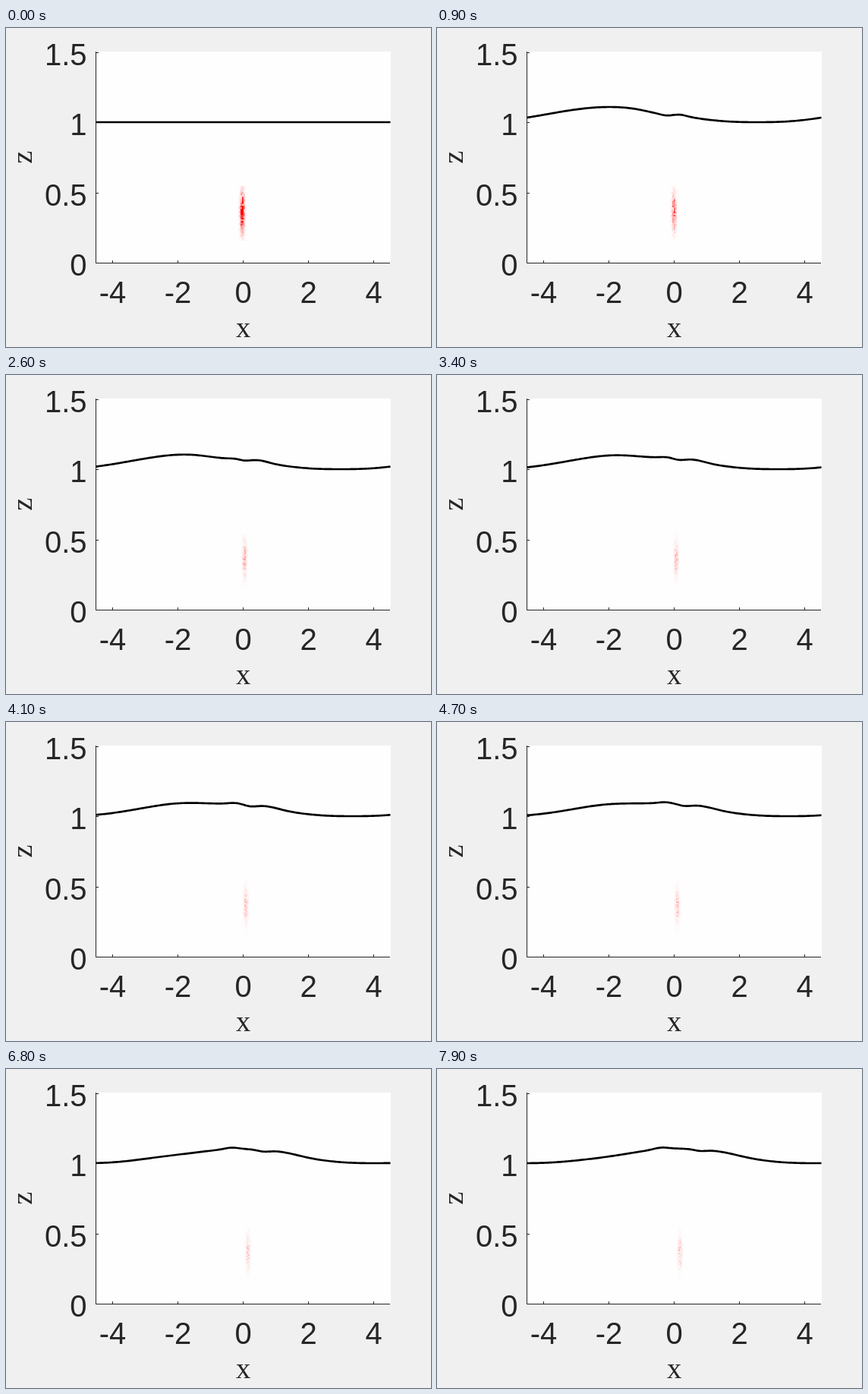
Recreate the animation shown at these times as an HTML page. Size 560 by 420 pixels, loop 8000 ms.

```html
<!DOCTYPE html>
<html lang="en">
<head>
<meta charset="utf-8">
<title>Surface wave over a cloud</title>
<style>
  html, body { margin: 0; width: 100%; height: 100%; overflow: hidden; background: #f0f0f0; }
  svg { display: block; width: 560px; height: 420px; }
  .tick { font: 40px "Liberation Sans", Arial, sans-serif; fill: #262626; }
  .label { font: 38.5px "Liberation Serif", Times, serif; fill: #262626; text-anchor: middle; }
</style>
</head>
<body>
<svg viewBox="0 0 560 420" xmlns="http://www.w3.org/2000/svg">
  <rect x="118" y="31" width="389" height="279" fill="#fefefe"/>
  <g id="cloud" fill="#f00" shape-rendering="crispEdges"></g>
  <path id="axes" fill="none" stroke="#262626"/>
  <path id="wave" fill="none" stroke="#000" stroke-width="2.67" stroke-linejoin="round"/>
  <g id="ticks" class="tick"></g>
  <text class="label" x="312.5" y="406.5">x</text>
  <text class="label" transform="translate(34 170.3) rotate(-90)">z</text>
</svg>
<script>
const $ = id => document.getElementById(id);
const LOOP = 8000, STEP = 100;
const LEFT = 118.5, RIGHT = 506.5, REST = 124;
const lerp = (a, b, k) => a + (b - a) * k;
const bell = (x, center, width) => Math.exp(-(((x - center) / width) ** 2) / 2);

function add(parent, tag, attrs, text = '') {
  const el = document.createElementNS('http://www.w3.org/2000/svg', tag);
  for (const k in attrs) el.setAttribute(k, attrs[k]);
  el.textContent = text;
  return parent.appendChild(el);
}

function drawAxes() {
  let d = 'M118.5 31V309.5H506';
  for (let z = 0; z <= 1.5; z += 0.5) {
    const y = Math.ceil(309 - z * 185.33) + 0.5;
    d += `M118.5 ${y}h3.5`;
    add($('ticks'), 'text', { x: 106.5, y: y + 16, 'text-anchor': 'end' }, z);
  }
  for (let x = -4; x <= 4; x += 2) {
    const px = 312.5 + x * 43;
    d += `M${px} 309.5v-3.5`;
    add($('ticks'), 'text', { x: px, y: 362, 'text-anchor': 'middle' }, x);
  }
  $('axes').setAttribute('d', d);
}

// Travelling periodic wave with a sharpened crest
function swell(x, t) {
  const crest = 218.6 + 10.8 * t;
  const c = (1 + Math.cos((x - crest) * 2 * Math.PI / (RIGHT - LEFT))) / 2;
  return 20 * c ** 1.3;
}

// Ripples drift away from the middle: two widening lobes, a crest and a dip
function ripple(x, t) {
  const onset = 1 - Math.exp(-t / 0.5);
  const crestGrowth = 1 - Math.exp(-t / 3);
  return onset * (
    2.2 * bell(x, 314 + 7.8 * t, 7 + 1.9 * t)
    - 3.1 * bell(x, 299 - 6.8 * t, 18 + 2.6 * t)
    + 2.1 * crestGrowth * bell(x, 310 - 1.9 * t, 9)
    - 1.8 * bell(x, 297 + 6.3 * t, 8));
}

function drawWave(t) {
  const points = [];
  for (let x = LEFT; x <= RIGHT; x += 2) {
    const rise = t > 0 ? swell(x, t) + ripple(x, t) : 0;
    points.push(`${x} ${(REST - rise).toFixed(2)}`);
  }
  $('wave').setAttribute('d', 'M' + points.join('L'));
}

const COLS = 6, ROWS = 36, CELL = 2;
const cells = Array.from({ length: COLS * ROWS }, () => add($('cloud'), 'rect', { width: CELL, height: CELL }));

function noise(i, frame) {
  const v = Math.sin(i * 12.9898 + frame * 78.233 + 1) * 43758.5453;
  return v - Math.floor(v);
}

// A dense column of dye that thins out while drifting right
function drawCloud(t) {
  const frame = Math.round(t * 10);
  const center = 311.4 + 1.1 * t;
  const left = Math.round(center) - COLS * CELL / 2;
  const fade = 0.17 + 0.9 * Math.exp(-t / 1.2);
  const height = lerp(13, 15, Math.exp(-t));
  cells.forEach((cell, i) => {
    const x = left + i % COLS * CELL, y = 208 + Math.floor(i / COLS) * CELL;
    const core = bell(x + 1, center, 1.7) * bell(y + 1, 242, height);
    const speckle = 0.3 + 1.4 * noise(i, frame);
    const alpha = Math.min(1, speckle * (fade * core + 0.07 * Math.sqrt(core) * fade));
    cell.setAttribute('x', x);
    cell.setAttribute('y', y);
    cell.setAttribute('fill-opacity', alpha.toFixed(3));
  });
}

let shown = -1;
function render(now) {
  const step = Math.floor(now % LOOP / STEP);
  if (step === shown) return;
  shown = step;
  const t = step * STEP / 1000;
  drawWave(t);
  drawCloud(t);
}

drawAxes();
render(0);
let start;
requestAnimationFrame(function tick(now) {
  start ??= now;
  render(now - start);
  requestAnimationFrame(tick);
});
</script>
</body>
</html>
```
